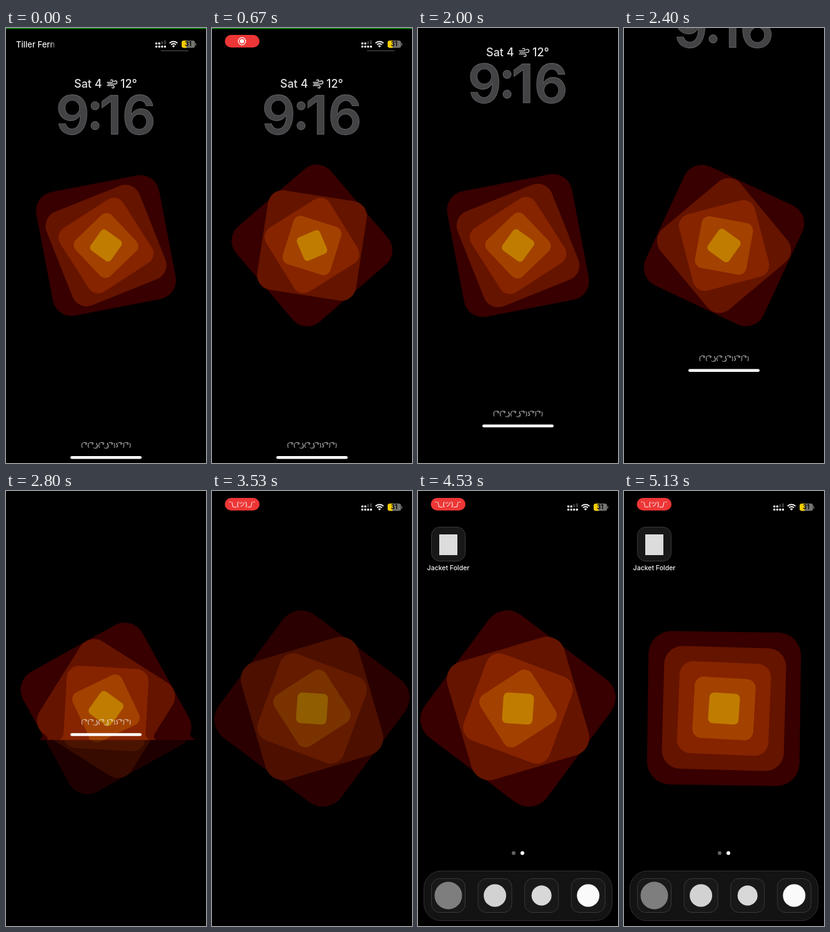
Recreate the animation shown at these times as an HTML page with a canvas. Size 320 px wide and 692 px high, loop 5.2 s.

```html
<!DOCTYPE html>
<html lang="en">
<head>
<meta charset="utf-8">
<title>Lock screen</title>
<style>
html, body { margin: 0; width: 100%; height: 100%; overflow: hidden; background: #000; }
canvas { display: block; width: 320px; height: 692px; }
</style>
</head>
<body>
<canvas id="stage"></canvas>
<script>
const W = 320, H = 692, LOOP = 5200;
const canvas = document.getElementById('stage');
const ctx = canvas.getContext('2d');
const dpr = window.devicePixelRatio || 1;
canvas.width = W * dpr;
canvas.height = H * dpr;

const SANS = 'Inter, "Noto Sans", sans-serif';
const WHITE = '#f6f6f6', SOFT = '#e2e2e2';
const LAYERS = ['#380000', '#651400', '#862400', '#a34200', '#c07c00'];
const LIFT = [[1660, 0], [1800, 14], [2000, 50], [2130, 68], [2400, 138], [2620, 225],
  [2800, 295], [3000, 425], [3200, 597], [3300, 710]];
const DIM = [[3300, 0.55], [3530, 0.75], [3950, 1]];
const DOCK_Y = [[3560, 100], [3700, 55], [3850, 15], [4000, -3], [4200, -2], [4500, 0]];
const APP_Y = [[3560, -95], [3700, -50], [3850, -17], [4000, -4], [4200, -1.5], [4500, 0]];

// Piecewise linear value through [time, value] points
function track(t, pts) {
  if (t <= pts[0][0]) return pts[0][1];
  for (let i = 1; i < pts.length; i++) {
    const [a, u] = pts[i - 1], [b, v] = pts[i];
    if (t < b) return u + (v - u) * (t - a) / (b - a);
  }
  return pts[pts.length - 1][1];
}
const ramp = (t, a, b) => Math.min(1, Math.max(0, (t - a) / (b - a)));

function layer(alpha, draw, dx = 0, dy = 0) {
  if (alpha <= 0) return;
  ctx.save();
  ctx.globalAlpha *= alpha;
  ctx.translate(dx, dy);
  draw();
  ctx.restore();
}

function box(x, y, w, h, r, fill, stroke) {
  ctx.beginPath();
  ctx.roundRect(x, y, w, h, r);
  if (fill) { ctx.fillStyle = fill; ctx.fill(); }
  if (stroke) { ctx.strokeStyle = stroke; ctx.lineWidth = 1; ctx.stroke(); }
}

function disc(x, y, r, fill) {
  ctx.beginPath();
  ctx.arc(x, y, r, 0, Math.PI * 2);
  ctx.fillStyle = fill;
  ctx.fill();
}

function label(str, x, y, font, fill, align = 'left') {
  ctx.font = font;
  ctx.textAlign = align;
  ctx.fillStyle = fill;
  ctx.fillText(str, x, y);
}

function squares(t, half, stretch = 1) {
  const turn = (-11 + 0.09 * t) * Math.PI / 180;
  LAYERS.forEach((color, i) => {
    const h = half * (1 - i / 5);
    ctx.save();
    ctx.translate(160, 346);
    ctx.scale(stretch, 1);
    ctx.rotate(turn * (i + 1));
    box(-h, -h, h * 2, h * 2, h * 0.3, color);
    ctx.restore();
  });
}

function clipped(y, h, draw) {
  ctx.save();
  ctx.beginPath();
  ctx.rect(0, y, W, h);
  ctx.clip();
  draw();
  ctx.restore();
}

function wallpaper(t, lift) {
  const half = 100 + 0.031 * lift;
  const edge = H - lift;
  squares(t, half);
  if (lift <= 0) return;
  ctx.fillStyle = `rgba(0,0,0,${1 - track(t, DIM)})`;
  ctx.fillRect(0, 0, W, H);
  if (edge <= 0) return;
  clipped(0, edge, () => {
    ctx.fillStyle = '#000';
    ctx.fillRect(0, 0, W, H);
    squares(t, half);
  });
  // bent light along the bottom edge of the lifted cover
  const rim = 12;
  for (let k = 0; k < rim; k++) {
    const s = 1 + 0.1 * ((k + 1) / rim) ** 3;
    clipped(Math.round(edge) - rim + k, 1, () => {
      ctx.fillStyle = '#000';
      ctx.fillRect(0, 0, W, H);
      squares(t, half, s);
    });
  }
}

function wind(x, y) {
  ctx.strokeStyle = SOFT;
  ctx.lineWidth = 1.3;
  ctx.lineCap = 'round';
  ctx.beginPath();
  ctx.moveTo(x, y - 2);
  ctx.lineTo(x + 7, y - 2);
  ctx.arc(x + 7, y - 4, 2, Math.PI / 2, -Math.PI * 0.8, true);
  ctx.moveTo(x + 1, y + 0.5);
  ctx.lineTo(x + 13, y + 0.5);
  ctx.arc(x + 13, y - 2, 2.5, Math.PI / 2, -Math.PI * 0.85, true);
  ctx.moveTo(x, y + 3);
  ctx.lineTo(x + 9, y + 3);
  ctx.arc(x + 9, y + 5, 2, -Math.PI / 2, Math.PI * 0.8);
  ctx.stroke();
}

function digit(ch, cx, base) {
  ctx.font = `600 85px ${SANS}`;
  ctx.textAlign = 'left';
  const m = ctx.measureText(ch);
  const x = cx - (m.actualBoundingBoxRight - m.actualBoundingBoxLeft) / 2;
  ctx.fillStyle = '#434346';
  ctx.fillText(ch, x, base);
  ctx.strokeStyle = 'rgba(200,200,200,0.4)';
  ctx.lineWidth = 0.8;
  ctx.strokeText(ch, x, base);
}

function lockScreen() {
  const date = `500 18px ${SANS}`;
  label('Sat 4', 109, 95, date, SOFT);
  wind(162, 88.5);
  label('12°', 183, 95, date, SOFT);
  digit('9', 107, 169);
  digit(':', 142.5, 161);
  digit('1', 166, 169);
  digit('6', 213, 169);
  label('( ͡°( ͡° ͜ʖ( ͡° ͜ʖ ͡°)ʖ ͡°) ͡°)', 160, 667, '8.5px "DejaVu Sans", sans-serif', WHITE, 'center');
  box(103, 681, 114, 4.5, 2.25, '#fff');
}

function statusIcons() {
  for (let i = 0; i < 4; i++) {
    const x = 239 + i * 4.6;
    box(x, 28, 3.2, 3.2, 1, WHITE);
    if (i < 2) box(x, 23, 3.2, 3.2, 1, WHITE);
    else box(x, 24 - i * 1.5, 3.2, 2.2 + i * 1.5, 1, '#3a3a3a');
  }
  ctx.strokeStyle = WHITE;
  ctx.lineCap = 'butt';
  ctx.lineWidth = 2;
  for (const r of [5.5, 9]) {
    ctx.beginPath();
    ctx.arc(268, 30.5, r, -Math.PI * 0.75, -Math.PI * 0.25);
    ctx.stroke();
  }
  ctx.beginPath();
  ctx.moveTo(268, 31);
  ctx.arc(268, 31, 3.2, -Math.PI * 0.75, -Math.PI * 0.25);
  ctx.fillStyle = WHITE;
  ctx.fill();
  box(281, 20, 21.5, 11.5, 3.5, '#747470');
  clipped(20, 12, () => {
    ctx.beginPath();
    ctx.rect(281, 20, 8, 12);
    ctx.clip();
    box(281, 20, 21.5, 11.5, 3.5, '#f6cc00');
  });
  box(303, 24, 1.3, 4, 0.6, '#747470');
  label('31', 291.5, 29.4, `700 10px ${SANS}`, '#0a0a0a', 'center');
}

function carrier() {
  const fade = ctx.createLinearGradient(70, 0, 82, 0);
  fade.addColorStop(0, WHITE);
  fade.addColorStop(1, 'rgba(246,246,246,0)');
  label('Tiller Fern', 16, 31, `500 13px ${SANS}`, fade);
}

function pill(t) {
  box(20.5, 11, 55.5, 20, 10, '#ee3636');
  const swap = ramp(t, 860, 1000);
  layer(1 - swap, () => {
    disc(48, 21, 3.4, '#fff');
    ctx.beginPath();
    ctx.arc(48, 21, 5.8, 0, Math.PI * 2);
    ctx.strokeStyle = '#fff';
    ctx.lineWidth = 1.3;
    ctx.stroke();
  });
  layer(swap, () => label('¯\\_(ツ)_/¯', 48, 24.5,
    '500 10px Inter, "Noto Sans CJK JP", "Noto Sans CJK", sans-serif', '#fff', 'center'));
}

function status(t) {
  const leave = 1 - ramp(t, 1670, 1800);
  const back = ramp(t, 3290, 3430);
  layer(leave, () => {
    ctx.fillStyle = '#0a7d0a';
    ctx.fillRect(0, 0, W, 1.6);
    ctx.fillStyle = '#404040';
    ctx.fillRect(248, 35.5, 44, 1.5);
  });
  layer(leave + back, () => {
    statusIcons();
    layer(1 - ramp(t, 90, 280), carrier);
    layer(ramp(t, 260, 480), () => pill(t));
  });
}

const tile = (x, y) => box(x + 0.5, y + 0.5, 54, 54, 13, '#181818', '#3a3a3a');

function homeScreen(t) {
  const show = ramp(t, 3560, 3850);
  const appY = track(t, APP_Y), dockY = track(t, DOCK_Y);
  layer(show, () => {
    tile(21, 57);
    box(34, 69, 29, 33, 0, '#dcdcdc');
    label('Jacket Folder', 48.5, 126, `500 10.5px ${SANS}`, WHITE, 'center');
  }, appY / 2, appY);
  layer(show, () => {
    disc(153, 576, 3, '#626262');
    disc(167, 576, 3, '#fff');
    box(9.5, 604.5, 301, 79, 27, '#131313', '#303030');
    const icons = [['#7e7e7e', 22], ['#d2d2d2', 18], ['#d8d8d8', 16], ['#fafafa', 18]];
    icons.forEach(([color, r], i) => {
      const x = 21 + i * 74.6;
      tile(x, 616);
      disc(x + 27.5, 643.5, r, color);
    });
  }, 0, dockY);
}

function frame() {
  const t = performance.now() % LOOP;
  const lift = track(t, LIFT);
  ctx.setTransform(dpr, 0, 0, dpr, 0, 0);
  ctx.fillStyle = '#000';
  ctx.fillRect(0, 0, W, H);
  wallpaper(t, lift);
  if (lift < 700) layer(1, lockScreen, 0, -lift);
  homeScreen(t);
  status(t);
  requestAnimationFrame(frame);
}
requestAnimationFrame(frame);
</script>
</body>
</html>
```
